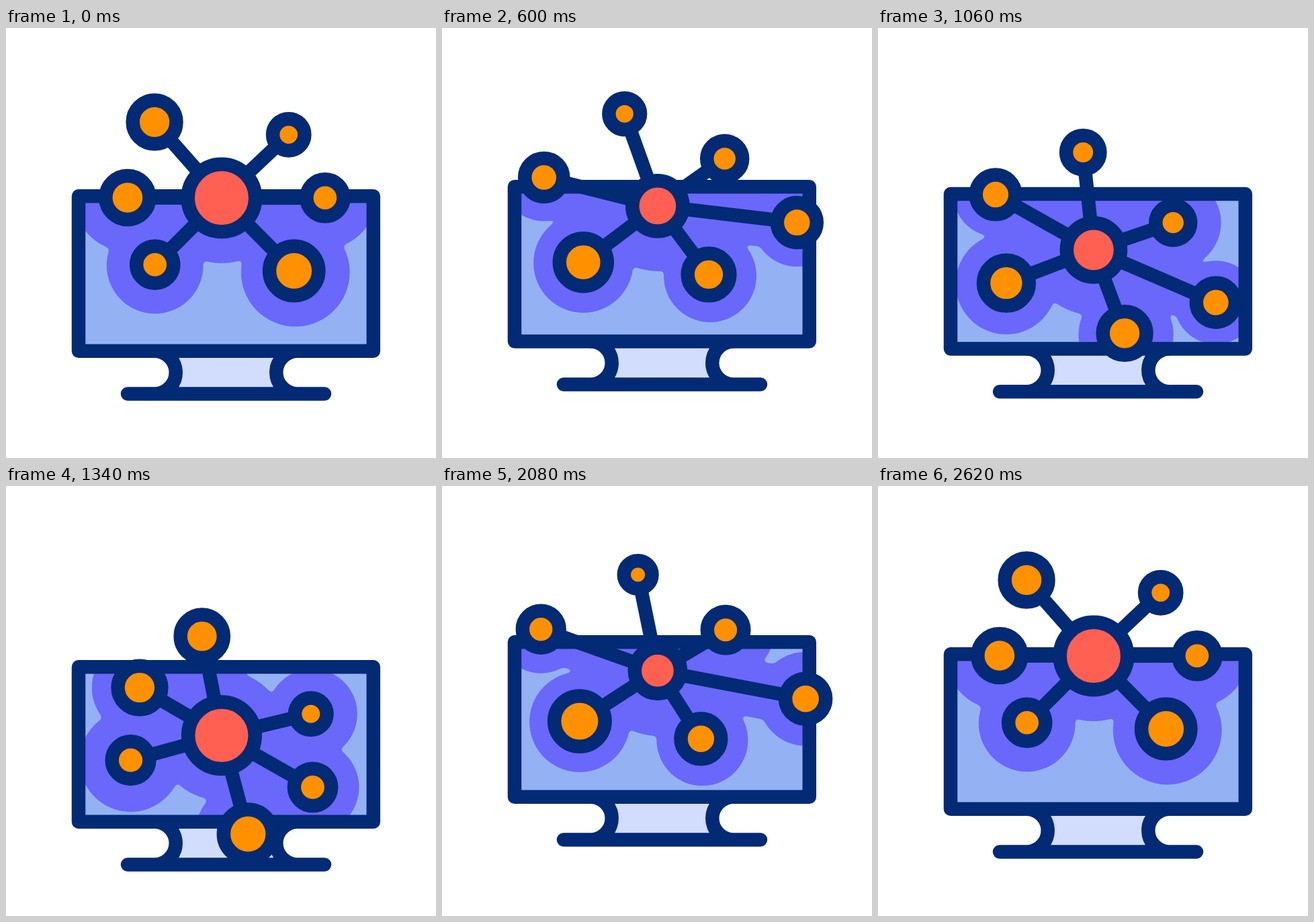
An HTML page for the animation above (2820 ms loop, 640 by 640 pixels).

```html
<!DOCTYPE html>
<html lang="en">
<head>
<meta charset="utf-8">
<title>Network monitor</title>
<style>
  html, body { margin: 0; width: 100%; height: 100%; overflow: hidden; background: #fff; }
  svg { display: block; width: 100vw; height: 100vh; }
  .line { fill: none; stroke: #032a75; stroke-width: 20.5; stroke-linecap: round; stroke-linejoin: round; }
</style>
</head>
<body>
<svg viewBox="0 0 640 640">
  <defs>
    <clipPath id="screen"><rect x="108" y="250.3" width="438.8" height="230.4"/></clipPath>
    <filter id="goo" filterUnits="userSpaceOnUse" x="-100" y="-100" width="840" height="840" color-interpolation-filters="sRGB">
      <feGaussianBlur stdDeviation="3.3"/>
      <feColorMatrix values="1 0 0 0 0  0 1 0 0 0  0 0 1 0 0  0 0 0 9 -4"/>
    </filter>
  </defs>
  <g id="scene">
    <path fill="#d2dcfd" d="M222.5 480.7A32 32 0 0 1 222.5 544.6H432.5A32 32 0 0 1 432.5 480.7Z"/>
    <path class="line" d="M222.5 480.7A32 32 0 0 1 222.5 544.6M432.5 480.7A32 32 0 0 0 432.5 544.6M181 544.6H474"/>
    <rect x="108" y="250.3" width="438.8" height="230.4" fill="#93b1f3"/>
    <g clip-path="url(#screen)">
      <g id="glow" filter="url(#goo)" fill="#6a67fb" stroke="#6a67fb"></g>
    </g>
    <rect class="line" x="108" y="250.3" width="438.8" height="230.4"/>
    <g id="net"></g>
  </g>
</svg>
<script>
const LOOP = 2820, START = 200, HALF = 600;
const CX = 320.9, CY = 253, LINE = 20.5, HUB_GLOW = 97;

// at: resting offset from the hub, shift: extra offset at mid swing,
// r: radius and its change, glow: radii at start, middle, end, dip between, offset
const nodes = [
  { at: [-99.8, -113],  shift: [43.7, -21.8],  r: [22.2, -12.2], glow: [86, 86, 86, 0, 0, 0] },
  { at: [-140, -0.5],   shift: [-44.9, -25],   r: [22.3, -5.4],  glow: [80, 66, 72, 6, 0, 0] },
  { at: [-99.2, 99.3],  shift: [1.4, -1.7],    r: [17.3, 10.7],  glow: [72, 75, 76, 0, 0, 1] },
  { at: [107.8, 108.5], shift: [-24.9, -23.9], r: [26.4, -7.1],  glow: [81, 68, 82, 3, 2, 2] },
  { at: [154, -0.3],    shift: [73.8, -4.7],   r: [17.3, 2.6],   glow: [75.5, 71.5, 70, 9, 0, 0] },
  { at: [99.8, -94.2],  shift: [-14.1, 14.7],  r: [13.4, 3.8],   glow: [70, 71, 67, 0, 2, 0] }
];

const byId = id => document.getElementById(id);
const scene = byId('scene'), glow = byId('glow'), net = byId('net');

function set(el, attrs) {
  for (const k in attrs) el.setAttribute(k, attrs[k]);
  return el;
}
function add(parent, tag, attrs) {
  return parent.appendChild(set(document.createElementNS('http://www.w3.org/2000/svg', tag), attrs));
}

for (const n of nodes) {
  n.beam = add(glow, 'line', { 'stroke-width': 84 });
  n.halo = add(glow, 'circle', { stroke: 'none' });
  n.link = add(net, 'line', { class: 'line' });
}
const hubHalo = add(glow, 'circle', { r: HUB_GLOW, stroke: 'none' });
const disc = color => add(net, 'circle', { class: 'line', style: 'fill:' + color });
for (const n of nodes) n.disc = disc('#ff9101');
const hub = disc('#ff6052');

const clamp = v => Math.min(1, Math.max(0, v));
const ease = u => u * u * (3 - 2 * u);
const mix = (a, b, s) => a + (b - a) * s;

function draw(time) {
  // there and back again
  const t = time % LOOP - START;
  const p = clamp(Math.min(t, 4 * HALF - t) / (2 * HALF));
  const turn = ease(p);
  const first = p < 0.5;
  const s = ease(first ? p * 2 : p * 2 - 1);
  const swing = first ? s : 1 - s;
  const key = (a, b, c) => first ? mix(a, b, s) : mix(b, c, s);

  const angle = turn * Math.PI / 6, cos = Math.cos(angle), sin = Math.sin(angle);
  const hy = CY + 100 * turn;

  set(scene, { transform: `translate(0 ${key(0, -19, 20)})` });
  set(hub, { cx: CX, cy: hy, r: 40 - 17 * swing + LINE / 2 });
  set(hubHalo, { cx: CX, cy: hy });

  for (const n of nodes) {
    const lx = n.at[0] + n.shift[0] * swing;
    const ly = n.at[1] + n.shift[1] * swing;
    const x = CX + lx * cos - ly * sin;
    const y = hy + lx * sin + ly * cos;
    const ends = { x1: CX, y1: hy, x2: x, y2: y };
    const [a, b, c, dip, ox, oy] = n.glow;
    set(n.link, ends);
    set(n.beam, ends);
    set(n.disc, { cx: x, cy: y, r: n.r[0] + n.r[1] * swing + LINE / 2 });
    set(n.halo, { cx: x + ox, cy: y + oy, r: key(a, b, c) - dip * 4 * s * (1 - s) });
  }
}

const t0 = performance.now();
function tick() {
  draw(performance.now() - t0);
  requestAnimationFrame(tick);
}
draw(0);
requestAnimationFrame(tick);
</script>
</body>
</html>
```
